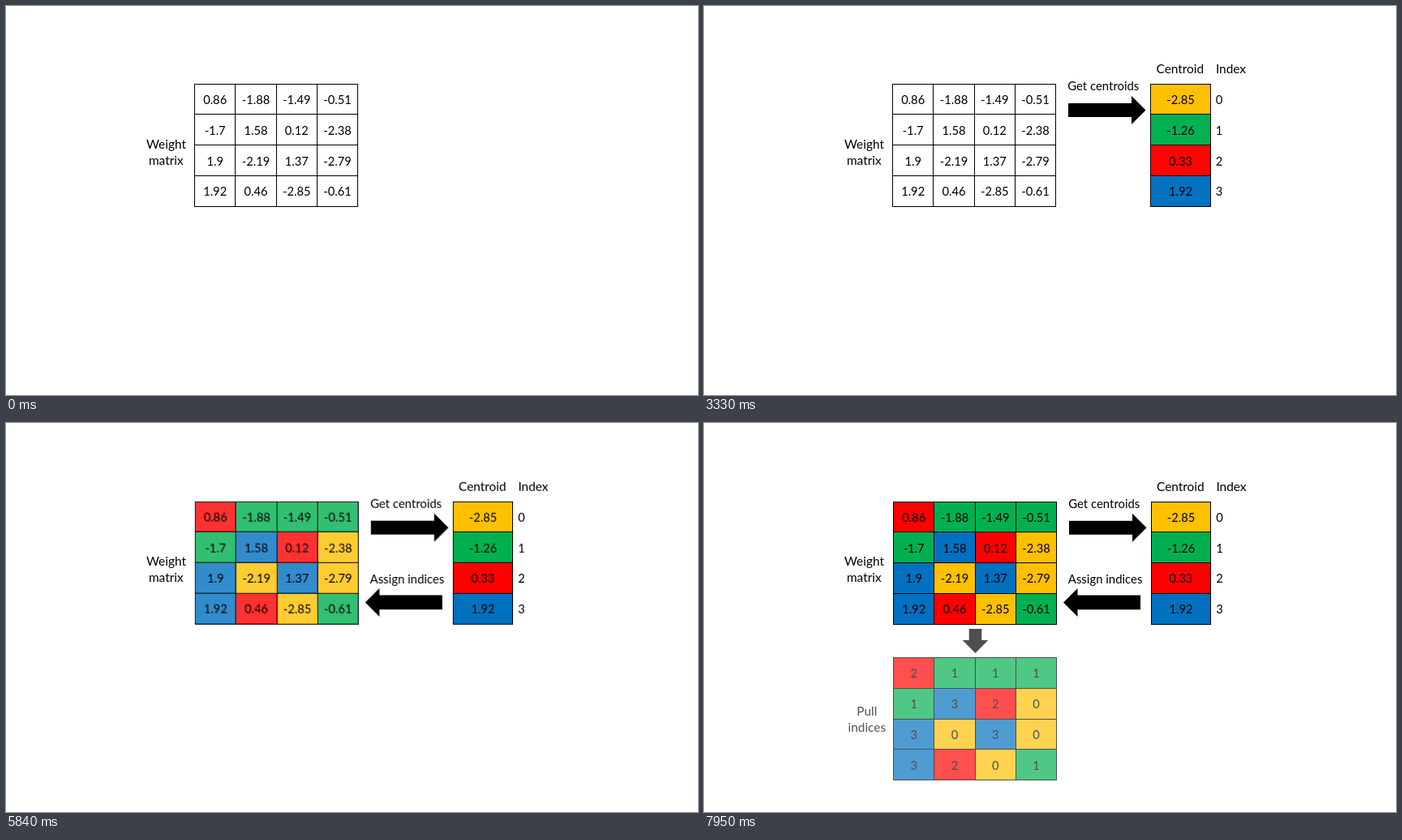
An HTML page that plays this animation: 853x480 px, repeating every 8 s.

```html
<!DOCTYPE html>
<html lang="en">
<head>
<meta charset="utf-8">
<title>Weight clustering</title>
<style>
  html, body { margin: 0; width: 100%; height: 100%; overflow: hidden; background: #fff; }
  svg { display: block; width: 100%; height: 100%; }
  text { font: 15.4px Lato, "Open Sans", sans-serif; }
  .num { font-size: 14.7px; }
  .label { font-size: 14.9px; }
  .mid { text-anchor: middle; }
  rect { shape-rendering: crispEdges; }
</style>
</head>
<body>
<svg id="stage" viewBox="0 0 853 480"></svg>
<script>
const LOOP = 8000, STEP = 60, TOP = 96.24, ROW = 37.75, COL = 50.3;
const BASE = ROW / 2 + 5.9;
const COLORS = ['#ffc000', '#00b050', '#ff0000', '#0070c0'];
const WEIGHTS = [0.86, -1.88, -1.49, -0.51, -1.7, 1.58, 0.12, -2.38,
                 1.9, -2.19, 1.37, -2.79, 1.92, 0.46, -2.85, -0.61];
const CENTROIDS = [-2.85, -1.26, 0.33, 1.92];
const INDICES = [...'2111132030303201'].map(Number);

const text = (x, y, s, cls = 'mid') => `<text x="${x}" y="${y}" class="${cls}">${s}</text>`;
const group = (id, body, dx = 0, dy = 0) =>
  `<g id="${id}" transform="translate(${dx} ${dy})">${body}</g>`;

// Cells first, then borders and numbers, so that every line stays whole.
function table(x, y, w, cols, values, fills) {
  const at = i => [x + (i % cols) * w, y + Math.floor(i / cols) * ROW];
  const cells = values.map((v, i) => {
    const [cx, cy] = at(i);
    return `<rect x="${cx}" y="${cy}" width="${w}" height="${ROW}" fill="${fills ? COLORS[fills[i]] : '#fff'}"/>`;
  });
  const nums = values.map((v, i) => {
    const [cx, cy] = at(i);
    return text(cx + w / 2, cy + BASE, v, 'num mid');
  });
  const rows = values.length / cols;
  const lines = [];
  for (let c = 0; c <= cols; c++)
    lines.push(`<rect x="${x + c * w - .5}" y="${y - .5}" width="1" height="${rows * ROW + 1}"/>`);
  for (let r = 0; r <= rows; r++)
    lines.push(`<rect x="${x - .5}" y="${y + r * ROW - .5}" width="${cols * w + 1}" height="1"/>`);
  return cells.concat(lines, nums).join('');
}

// Block arrow drawn from its tail end, pointing right before rotation.
const arrow = (x, y, turn, len, neck, thick, head) =>
  `<path transform="translate(${x} ${y}) rotate(${turn})" d="M0 ${-thick}H${neck}V${-head}L${len} 0L${neck} ${head}V${thick}H0Z"/>`;

function scene(name, dx, shift, dy, fills) {
  const centroidTable = text(586.8, 83, 'Centroid') + text(630.9, 83, 'Index', '') +
    table(550.6, TOP, 73.8, 1, CENTROIDS, [0, 1, 2, 3]) +
    CENTROIDS.map((c, i) => text(630.8, TOP + BASE + i * ROW, i, 'num')).join('');
  return text(197.5, 176, 'Weight') + text(197.3, 196, 'matrix') +
    group(name + 'Matrix', table(232.5, TOP, COL, 4, WEIGHTS, fills), dx, dy) +
    group(name + 'Get', text(492.3, 104.2, 'Get centroids', 'label mid') +
      arrow(449, 128.5, 0, 95.5, 78, 8.6, 17.5), dx, dy) +
    group(name + 'Table', centroidTable, shift, dy) +
    group(name + 'Assign', text(493.6, 198, 'Assign indices', 'label mid') +
      arrow(537, 221, 180, 95, 77.5, 8.8, 17.5), dx, dy / 2);
}

const stage = document.getElementById('stage');
stage.innerHTML =
  scene('plain', 0, 0, 0) +
  group('colored', '<rect width="853" height="480" fill="#fff"/>' + scene('full', 1, .5, .76, INDICES)) +
  group('pull', arrow(334.5, 254, 90, 30, 14, 7.8, 15.8) +
    text(200.8, 361, 'Pull') + text(200.8, 381, 'indices') +
    table(233.5, 289.7, COL, 4, INDICES, INDICES));

// Progress from 0 to 1, advancing in steps counted from the first visible one.
function ramp(t, first, start, length) {
  if (t < first) return 0;
  const held = first + Math.floor((t - first) / STEP) * STEP;
  return Math.min(1, (held - start) / length);
}
const easeOut = p => 1 - (1 - p) ** 2;
const show = (id, opacity) => document.getElementById(id).setAttribute('opacity', opacity);

function draw(t) {
  show('plainGet', ramp(t, 1070, 1020, 930));
  show('plainTable', ramp(t, 2430, 2415, 930));
  show('plainAssign', ramp(t, 3850, 3810, 930));
  show('colored', easeOut(ramp(t, 4940, 4930, 1640)));
  show('pull', ramp(t, 7410, 7317, 925));
}

const begin = performance.now();
function tick() {
  draw((performance.now() - begin) % LOOP);
  requestAnimationFrame(tick);
}
tick();
</script>
</body>
</html>
```
